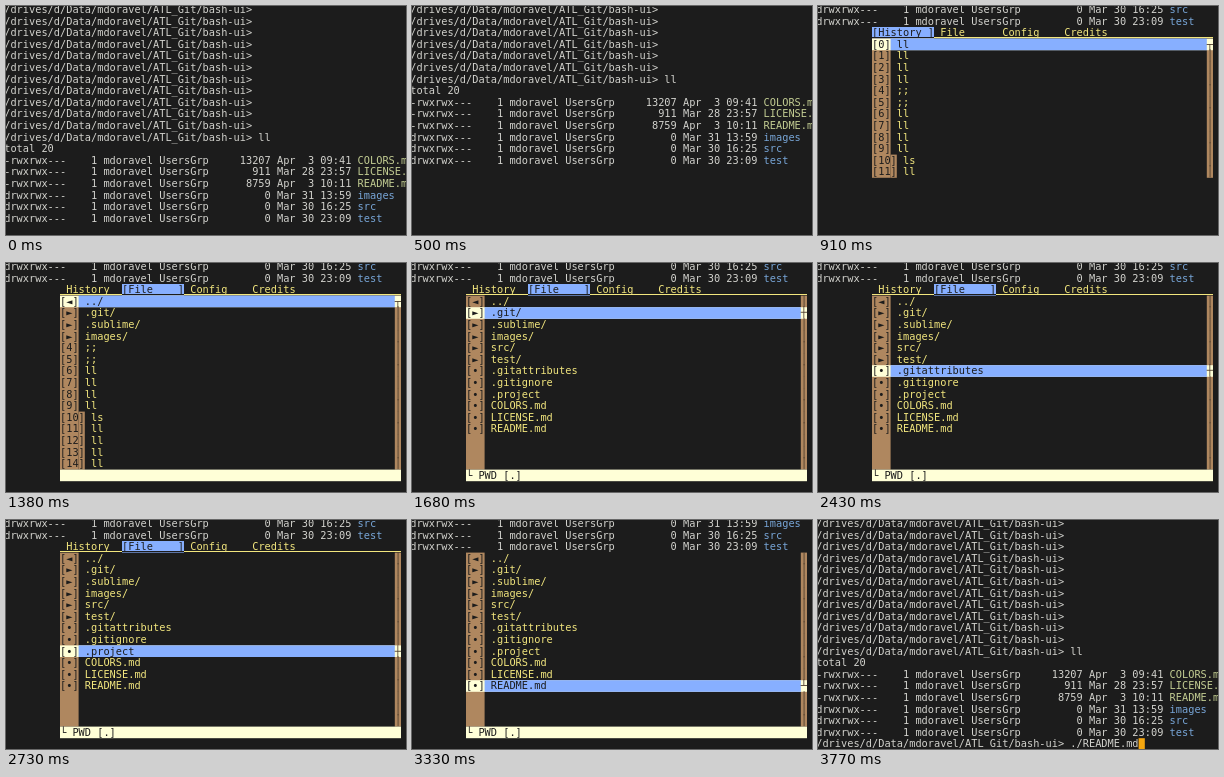
An HTML page with a canvas for the animation above (4770 ms loop, 400 by 229 pixels).

```html
<!DOCTYPE html>
<html lang="en">
<head>
<meta charset="utf-8">
<title>Terminal menu</title>
<style>
html, body { margin: 0; height: 100%; overflow: hidden; background: #1c1c1c; }
canvas { display: block; }
</style>
</head>
<body>
<canvas id="stage" width="400" height="229"></canvas>
<script>
const ctx = document.getElementById('stage').getContext('2d');
const LOOP = 4770;
const CELL_W = 6.2, CELL_H = 11.6, LEFT = -1.8, TOP = -2.2, BASELINE = 9.2;
const BG = '#1c1c1c', FG = '#d2d2cd', BLUE = '#87afff', CREAM = '#ffffd7',
      BROWN = '#af875f', YELLOW = '#f2e67e', EXEC = '#c2cc92', DIR = '#78a6d8',
      CURSOR = '#f5a60f', TRACK = '#4a3a2b';
const PANEL = 9, PANEL_END = 64, LIST_TOP = 3, LIST_ROWS = 15;
const STATUS_ROW = LIST_TOP + LIST_ROWS;

const prompt = '/drives/d/Data/mdoravel/ATL_Git/bash-ui>';
const listing = [
  ['-', 13207, 'Apr  3 09:41', 'COLORS.md'],
  ['-', 911, 'Mar 28 23:57', 'LICENSE.md'],
  ['-', 8759, 'Apr  3 10:11', 'README.md'],
  ['d', 0, 'Mar 31 13:59', 'images'],
  ['d', 0, 'Mar 30 16:25', 'src'],
  ['d', 0, 'Mar 30 23:09', 'test']
].map(([type, size, date, name]) => ({
  text: `${type}rwxrwx---    1 mdoravel UsersGrp${String(size).padStart(10)} ${date}`,
  name, color: type === 'd' ? DIR : EXEC
}));
const lines = [
  ...Array(11).fill({ text: prompt }),
  { text: prompt + ' ll' }, { text: 'total 20' }, ...listing
];

const commands = { 4: ';;', 5: ';;', 10: 'ls' };
const historyItems = Array.from({ length: LIST_ROWS },
  (_, i) => [`[${i}]`, commands[i] || 'll']);
const fileItems = ['../', '.git/', '.sublime/', 'images/', 'src/', 'test/',
  '.gitattributes', '.gitignore', '.project', 'COLORS.md', 'LICENSE.md', 'README.md']
  .map((name, i) => [i === 0 ? '[◄]' : i < 6 ? '[►]' : '[•]', name]);
const lastFile = fileItems.length - 1;
const tabs = ['History', 'File', 'Config', 'Credits'];

const colX = col => LEFT + col * CELL_W;
const rowY = row => TOP + row * CELL_H;

function box(col, row, endCol, color, endRow = row + 1) {
  ctx.fillStyle = color;
  ctx.fillRect(colX(col), rowY(row), (endCol - col) * CELL_W, (endRow - row) * CELL_H);
}

function print(col, row, text, color) {
  ctx.fillStyle = color;
  ctx.fillText(text, colX(col), rowY(row) + BASELINE);
}

function drawTerminal(scroll, limit = lines.length) {
  lines.slice(scroll, scroll + limit).forEach((line, row) => {
    print(0, row, line.text, FG);
    if (line.name) print(57, row, line.name, line.color);
  });
}

function underline(col, endCol, color) {
  ctx.fillStyle = color;
  ctx.fillRect(colX(col), 31, (endCol - col) * CELL_W, 1);
}

function drawTabs(active) {
  underline(PANEL, PANEL_END, YELLOW);
  tabs.forEach((name, i) => {
    const col = PANEL + i * 10;
    if (i === active) {
      box(col, 2, col + 10, BLUE);
      print(col, 2, `[${name.padEnd(8)}]`, BG);
      underline(col, col + 10, BG);
    } else {
      print(col + 1, 2, name, YELLOW);
    }
  });
}

function drawPanel(t) {
  const fileRows = t < 1380 ? 0 : t < 1530 ? 4 : LIST_ROWS;
  const shown = t < 980 ? 12 : LIST_ROWS;
  const end = LIST_TOP + shown;
  const selected = t < 1680 ? 0 : Math.min(lastFile, 1 + Math.floor((t - 1680) / 150));
  const scrollCol = PANEL_END - 1;

  box(PANEL, LIST_TOP, PANEL + 3, BROWN, end);
  if (t < 1530) box(PANEL + 3, LIST_TOP + 10, PANEL + 4, BROWN, end);
  box(scrollCol, LIST_TOP, PANEL_END, BROWN, end);

  for (let i = 0; i < shown; i++) {
    const row = LIST_TOP + i, active = i === selected;
    const [label, text] = (i < fileRows ? fileItems : historyItems)[i] || ['', ''];
    const textCol = PANEL + label.length;
    if (active) {
      box(PANEL, row, PANEL_END, CREAM);
      box(textCol, row, scrollCol, BLUE);
    }
    print(PANEL, row, label, BG);
    print(textCol + 1, row, text, active ? BG : YELLOW);
    const mark = i === 0 ? '┬' : i === lastFile ? '┴' : '┼';
    print(scrollCol, row, active ? mark : '│', TRACK);
  }
  if (t >= 980) box(PANEL, STATUS_ROW, PANEL_END, CREAM);
  if (t >= 1530) print(PANEL, STATUS_ROW, '└ PWD [.]', BG);
}

function draw(t) {
  ctx.fillStyle = BG;
  ctx.fillRect(0, 0, 400, 229);
  ctx.font = '10.3px "DejaVu Sans Mono", monospace';

  if (t < 500 || t >= 3620) drawTerminal(0);
  else if (t < 580 || t >= 3550) drawTerminal(5);
  else if (t < 660 || t >= 3480) drawTerminal(11);
  else drawTerminal(t < 3330 ? 17 : 16, 3);

  if (t >= 740 && t < 3330) drawTabs(t < 1230 ? 0 : 1);
  if (t >= 910 && t < 3480) drawPanel(t);
  if (t >= 3770) {
    print(0, 19, prompt + ' ./README.md', FG);
    box(52, 19, 53, CURSOR);
  }
}

function tick(now) {
  draw(now % LOOP);
  requestAnimationFrame(tick);
}
tick(performance.now());
</script>
</body>
</html>
```
